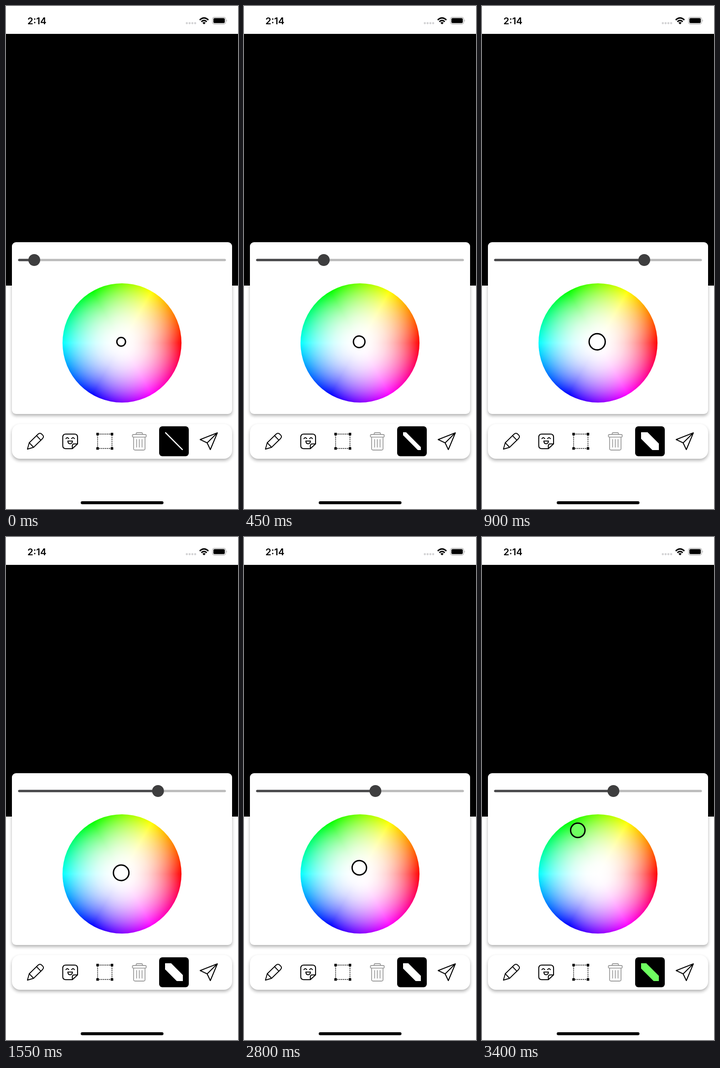
These frames come from a looping animation (509 px wide and 1101 px high, 3450 ms). An HTML page:

```html
<!DOCTYPE html>
<html lang="en">
<head>
<meta charset="utf-8">
<title>Brush size and colour picker</title>
<style>
  html, body { margin: 0; width: 100%; height: 100%; overflow: hidden; background: #fff; }
  #stage { position: relative; width: 509px; height: 1101px; overflow: hidden; background: #fff; }
  #stage > * { position: absolute; }
  #canvas { left: 0; top: 61px; width: 509px; height: 551px; background: #000; }
  .card { left: 13px; width: 483px; background: #fff; box-shadow: 0 4px 7px rgba(0, 0, 0, .3); }
  #panel { top: 517px; height: 376px; border-radius: 9px; }
  #tools { top: 915px; height: 76px; border-radius: 18px; }
  #wheel { left: 124px; top: 607px; width: 261px; height: 261px; border-radius: 50%; }
  svg { left: 0; top: 0; }
  .icon { fill: none; stroke: #000; stroke-width: 2.1; stroke-linejoin: round; stroke-linecap: round; }
  .time { font: 600 20.5px Inter, "Liberation Sans", sans-serif; }
</style>
</head>
<body>
<div id="stage">
  <div id="canvas"></div>
  <div id="panel" class="card"></div>
  <div id="tools" class="card"></div>
  <div id="wheel"></div>
  <svg width="509" height="1101" viewBox="0 0 509 1101">
    <defs>
      <clipPath id="swatch"><rect x="349" y="933" width="39" height="39"/></clipPath>
    </defs>

    <!-- status bar -->
    <text class="time" x="47" y="40">2:14</text>
    <g fill="#d2d2d4">
      <circle cx="396.7" cy="37.6" r="2.3"/><circle cx="402.8" cy="37.6" r="2.3"/>
      <circle cx="408.9" cy="37.6" r="2.3"/><circle cx="415" cy="37.6" r="2.3"/>
    </g>
    <g fill="none" stroke="#000" stroke-width="3">
      <path d="M425 30.6Q434.5 21.6 444 30.6"/>
      <path d="M428.6 34.3Q434.5 28.9 440.4 34.3"/>
    </g>
    <path d="M434.5 40.2L431 36.6Q434.5 33.8 438 36.6Z"/>
    <rect x="453" y="24.6" width="29" height="15" rx="4.4" fill="none" stroke="#a5a5a5" stroke-width="1.2"/>
    <rect x="455" y="26.6" width="25" height="11" rx="2.8"/>
    <path d="M483.6 29.6Q486 32.1 483.6 34.6Z" fill="#a5a5a5"/>

    <!-- slider -->
    <rect x="26.5" y="553.5" width="456" height="5" rx="2.5" fill="#bbb"/>
    <rect id="fill" x="26.5" y="553.5" height="5" rx="2.5" fill="#464648"/>
    <circle id="thumb" cy="556" r="13" fill="#3e3e3f"/>

    <circle id="ring" stroke="#000" stroke-width="3"/>

    <!-- toolbar -->
    <g class="icon">
      <g stroke-width="1.9">
        <path d="M47 970L51 956L70.5 937Q74.5 933.3 78.3 937L80.5 939.2Q84 943 80 947L60.5 966Z"/>
        <path d="M51 956L60.5 966M67 940.5L76.5 950.3"/>
      </g>
      <path d="M157 958.5V944Q157 937 150 937H131.5Q124.5 937 124.5 944V962Q124.5 969 131.5 969H145.5L157 958.5H150Q145.5 958.5 145.5 963V969"/>
      <path d="M131.5 947Q134.5 942.6 137.5 947M144 947Q147 942.6 150 947M135.7 952.2H145.8Q145.4 958.2 140.7 958.2T135.7 952.2Z"/>
      <rect x="201" y="937" width="31.5" height="31.5" stroke-width="1.4" stroke-linecap="butt" stroke-dasharray="2.6 1.6" style="stroke-linecap:butt;stroke-width:1.4"/>
      <g style="stroke:#9c9c9c;stroke-width:1.8">
        <rect x="277.3" y="938" width="30.4" height="5.6" rx="2.4"/>
        <path d="M285.5 938V936.5Q285.5 934 288 934H297Q299.5 934 299.5 936.5V938"/>
        <path d="M280 943.8V968.5Q280 972 283.5 972H301.5Q305 972 305 968.5V943.8"/>
        <path d="M286.5 949V965.5M292.5 949V965.5M298.5 949V965.5"/>
      </g>
    </g>
    <path d="M198.2 934.2h5.6v5.6h-5.6zM229.7 934.2h5.6v5.6h-5.6zM198.2 965.7h5.6v5.6h-5.6zM229.7 965.7h5.6v5.6h-5.6z"/>
    <rect x="336" y="920" width="65" height="65.5" rx="7"/>
    <g clip-path="url(#swatch)">
      <path id="line" d="M349 933L388 972" stroke-linecap="square"/>
    </g>
    <path class="icon" d="M463.7 934.3L426 949L441.3 956.3L448.3 971Z M441.3 956.3L463.7 934.3"/>

    <rect x="164" y="1084" width="181.5" height="6.4" rx="3.2"/>
  </svg>
</div>
<script>
const LOOP = 3450, STEP = 50;
const WHEEL = { x: 254.5, y: 737.5, r: 130.5, gamma: 2.2 };

// [ms, thumb x]
const SLIDE = [[0, 62], [250, 110], [450, 175], [650, 262], [900, 356], [1050, 377],
  [1100, 379], [1400, 379], [1450, 360], [1550, 333.5], [1650, 308], [1750, 288.3]];
// [ms, ring x, ring y]
const PICK = [[0, 252.7, 735], [2750, 252.7, 735], [2800, 253, 724], [2900, 251.5, 693], [3000, 247.5, 666],
  [3100, 240, 648], [3200, 228, 636], [3300, 218.5, 632], [3350, 214, 636], [3400, 210.2, 642]];

const $ = id => document.getElementById(id);
const saturation = r => Math.min(1, r) ** WHEEL.gamma;

function sample(keys, t) {
  const i = keys.findIndex(k => k[0] > t);
  if (i < 0) return keys[keys.length - 1].slice(1);
  const a = keys[i - 1], b = keys[i];
  const p = (t - a[0]) / (b[0] - a[0]);
  return a.slice(1).map((v, j) => v + (b[j + 1] - v) * p);
}

function colorAt(x, y) {
  const dx = x - WHEEL.x, dy = WHEEL.y - y;
  const hue = (Math.atan2(dy, dx) * 3 / Math.PI + 6) % 6;
  const s = saturation(Math.hypot(dx, dy) / WHEEL.r);
  const channel = n => {
    const k = (n + hue) % 6;
    return Math.round(255 * (1 - s * Math.max(0, Math.min(k, 4 - k, 1))));
  };
  return `rgb(${channel(5)},${channel(3)},${channel(1)})`;
}

function paintWheel() {
  const stops = Array.from({ length: 17 }, (_, i) =>
    `rgba(255,255,255,${(1 - saturation(i / 16)).toFixed(3)}) ${i * 6.25}%`);
  $('wheel').style.background =
    `radial-gradient(circle closest-side, ${stops}),` +
    'conic-gradient(from 90deg, #f00, #f0f, #00f, #0ff, #0f0, #ff0, #f00)';
}

function draw(ms) {
  let t = Math.floor((ms % LOOP) / STEP) * STEP;
  if (t >= 1450 && t < 1850) t -= (t - 1450) % 100; // slower updates here
  const [pos] = sample(SLIDE, t);
  const [x, y] = sample(PICK, t);
  const drag = pos - 62;
  const color = colorAt(x, y);
  const set = (id, attrs) => {
    for (const k in attrs) $(id).setAttribute(k, attrs[k]);
  };
  set('fill', { width: pos - 26.5 });
  set('thumb', { cx: pos });
  set('ring', { cx: x, cy: y, r: 9.5 + drag * .0278, fill: color });
  set('line', { stroke: color, 'stroke-width': 2.6 + drag * .0597 });
}

paintWheel();
const start = performance.now();
function tick() {
  draw(performance.now() - start);
  requestAnimationFrame(tick);
}
tick();
</script>
</body>
</html>
```
